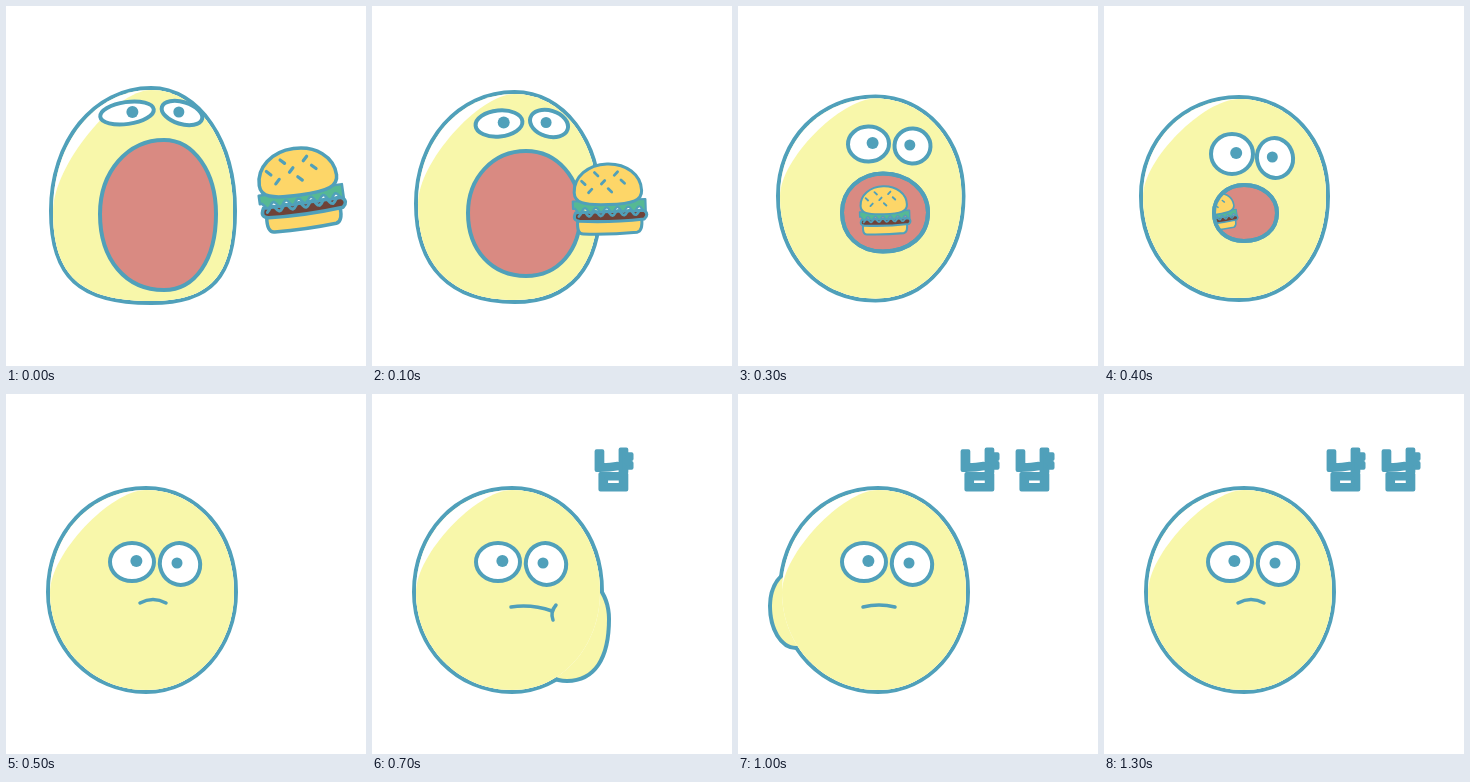
Write an HTML page with a canvas that moves like this. It is 360 px wide and 360 px high and loops after 1400 ms.

```html
<!DOCTYPE html>
<html lang="ko">
<head>
<meta charset="utf-8">
<style>
html, body { margin: 0; height: 100%; overflow: hidden; background: #fff; }
canvas { display: block; width: 360px; height: 360px; }
</style>
</head>
<body>
<canvas></canvas>
<script>
const canvas = document.querySelector('canvas');
const ctx = canvas.getContext('2d');
const dpr = window.devicePixelRatio || 1;
canvas.width = canvas.height = 360 * dpr;

const LINE = '#50a0ba', SKIN = '#f8f7aa', MOUTH = '#d98a82';
const BUN = '#fdd668', LEAF = '#56b993', MEAT = '#6f4238';

// eggs: left, top, right, bottom, apex x, widest y, lower roundness
// eyes: x, y, rx, ry, tilt
const gulp = [
  { body: [47,84,227,295, 145,205, .72], mouth: [94,134,210,284, 158,208, .6],
    left: [121,107,27,11,-.14], right: [176,107,21,11,.3], burger: [294,182] },
  { body: [45,92,225,293, 140,190, .58], mouth: [98,156,207,256, 150,206, .58],
    left: [133,128,20,15,-.05], right: [178,128,18,15,.3], burger: [180,203] },
  { body: [39,93,222,292, 135,190, .58], mouth: [110,179,173,235, 140,207, .6],
    left: [128,148,21,20,0], right: [171,152,18,20,-.2], burger: [113,205] }
];
const rest = { body: [44,96,228,296, 140,198, .56],
  left: [126,168,22,19,0], right: [174,170,20,21,-.4] };

const cheeks = { left: [34,178,90,252, 58,212, .56], right: [160,180,235,285, 195,225, .65] };
const lips = {
  rest: 'M134 209Q147 202 160 209',
  right: 'M139 213Q160 210 180 217M184 211Q178 218 181 226',
  left: 'M125 213Q141 209 157 213'
};

function mix(a, b, t) {
  const out = {};
  for (const key in a) out[key] = a[key].map((v, i) => v + (b[key][i] - v) * t);
  return out;
}

// four quarter curves; dent flattens the upper left one
function egg([l, t, r, b, x, y, low], dent = 0) {
  const path = new Path2D();
  const upper = .57, flat = upper - dent;
  path.moveTo(x, t);
  path.bezierCurveTo(x + (r - x) * upper, t, r, y - (y - t) * upper, r, y);
  path.bezierCurveTo(r, y + (b - y) * low, x + (r - x) * low, b, x, b);
  path.bezierCurveTo(x - (x - l) * low, b, l, y + (b - y) * low, l, y);
  path.bezierCurveTo(l, y - (y - t) * flat, x - (x - l) * flat, t, x, t);
  path.closePath();
  return path;
}

function oval(x, y, rx, ry = rx, tilt = 0) {
  const path = new Path2D();
  path.ellipse(x, y, rx, ry, tilt, 0, 7);
  return path;
}

function paint(path, fill, width = 4) {
  if (fill) { ctx.fillStyle = fill; ctx.fill(path); }
  if (width) { ctx.lineWidth = width; ctx.strokeStyle = LINE; ctx.stroke(path); }
}

function drawBurger(x, y, scale, tilt) {
  ctx.save();
  ctx.translate(x, y);
  ctx.rotate(tilt);
  ctx.scale(scale, scale);
  paint(new Path2D('M-37 24Q-39 40 -31 40Q0 42 31 40Q38 39 37 24Z'), BUN, 3.5);
  paint(new Path2D('M-39 15Q-44 24 -35 25Q0 28 40 25Q46 20 40 15Z'), MEAT, 3.5);

  const leaf = new Path2D('M42 2L-42 2'), frill = new Path2D();
  for (let px = -42; px <= 42; px += 2) {
    leaf.lineTo(px, 13 + 3 * Math.sin(px * .5));
    frill.lineTo(px * .85, 17 + 3 * Math.sin(px * .4));
  }
  leaf.closePath();
  paint(leaf, LEAF, 2.5);
  paint(frill, null, 3);

  paint(egg([-40, -40, 38, 7, -1, -8, .75]), BUN, 3.5);
  const seeds = new Path2D();
  for (let i = 0; i < 7; i++) {
    const sx = -29 + 7.6 * i, sy = -19 + 11 * Math.sin(i * Math.PI * 2 / 3);
    const slant = i % 2 ? -2 : 2;
    seeds.moveTo(sx - 2, sy - slant);
    seeds.lineTo(sx + 2, sy + slant);
  }
  paint(seeds, null, 3.2);
  ctx.restore();
}

function drawFace({ body, left, right }, cheek) {
  const parts = [body, cheek].filter(Boolean).map(shape => egg(shape));
  // wide strokes below the fills leave one joined outline
  for (const part of parts) paint(part, null, 8);
  for (const part of parts) paint(part, SKIN, 0);
  paint(egg(body), '#fff', 0);
  paint(egg(body, .2), SKIN, 0);

  paint(oval(...left), '#fff');
  paint(oval(...right), '#fff');
  paint(oval(left[0] + left[2] * .2, left[1] - 1, 6), LINE, 0);
  paint(oval(right[0] - right[2] * .15, right[1] - 1, 5.5), LINE, 0);
}

function drawEating(k) {
  const pose = mix(gulp[Math.floor(k)], gulp[Math.ceil(k)], k % 1);
  const mouth = egg(pose.mouth);
  drawFace(pose);
  paint(mouth, MOUTH);
  ctx.save();
  if (k > 1) ctx.clip(mouth);
  drawBurger(...pose.burger, 1 - .27 * k, -.14 * (1 - k) ** 2);
  ctx.restore();
  if (k > 1) paint(mouth);
}

function drawWord(x) {
  ctx.fillStyle = ctx.strokeStyle = LINE;
  ctx.lineWidth = 4;
  ctx.fillText('냠', x, 92);
  ctx.strokeText('냠', x, 92);
}

function drawChewing(step) {
  const side = step < 7 || step > 12 ? 'rest' : step % 2 ? 'right' : 'left';
  drawFace(rest, cheeks[side]);
  paint(new Path2D(lips[side]), null, 3.5);
  if (step >= 6) drawWord(241);
  if (step >= 9) drawWord(296);
}

function frame(now) {
  const step = Math.floor(now % 1400 / 100);
  ctx.setTransform(dpr, 0, 0, dpr, 0, 0);
  ctx.clearRect(0, 0, 360, 360);
  ctx.lineCap = ctx.lineJoin = 'round';
  ctx.textAlign = 'center';
  ctx.font = '900 43px "Noto Sans CJK KR", "Noto Sans CJK", sans-serif';
  if (step < 5) drawEating(step / 2);
  else drawChewing(step);
}

let start;
function tick(now) {
  start ??= now;
  frame(now - start);
  requestAnimationFrame(tick);
}
requestAnimationFrame(tick);
</script>
</body>
</html>
```
